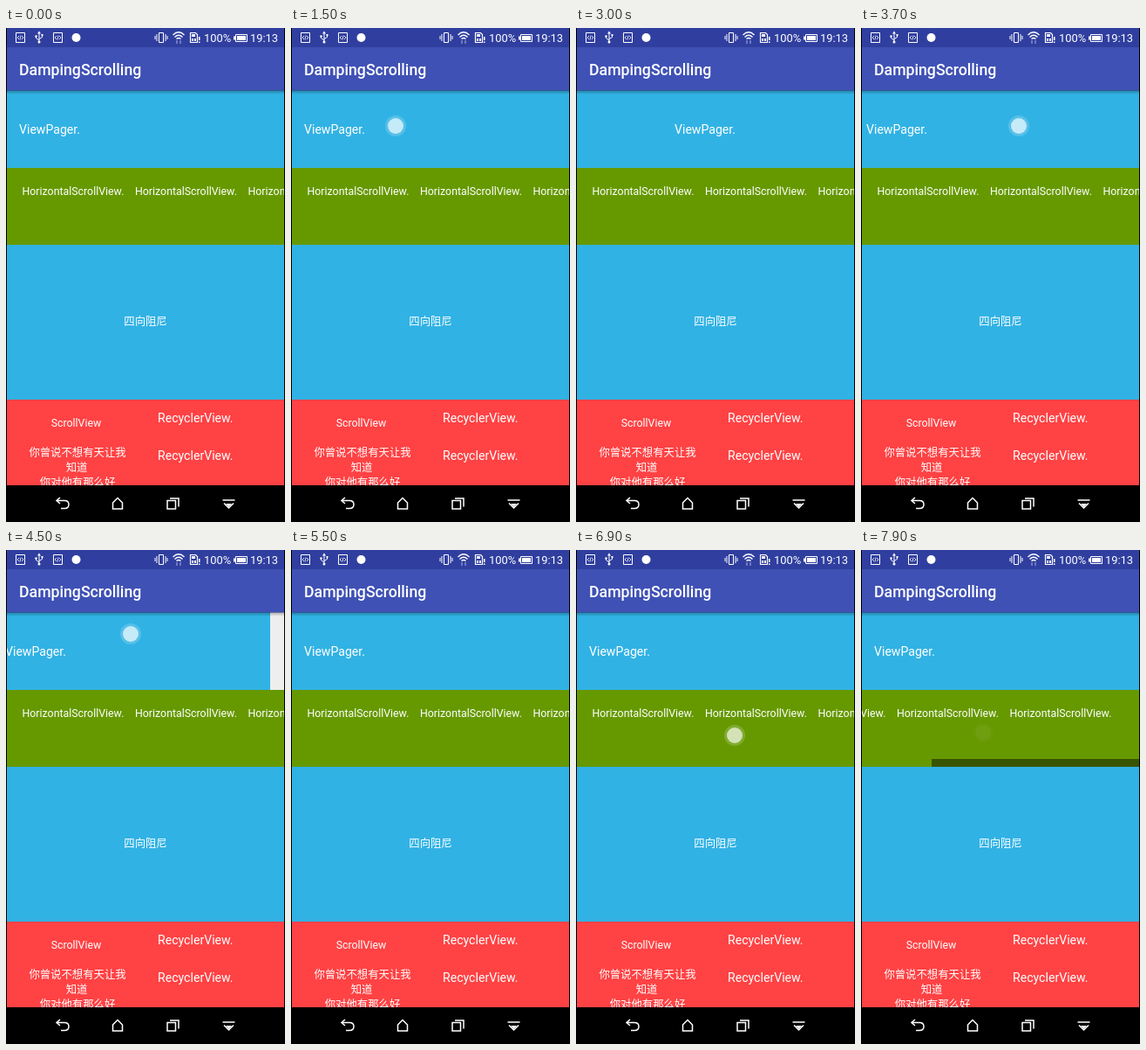
Write an HTML page with a canvas that moves like this. It is 320x565 px and loops after 8000 ms.

```html
<!DOCTYPE html>
<html lang="en">
<head>
<meta charset="utf-8">
<title>Damping scrolling</title>
<style>
  html, body { margin: 0; height: 100%; overflow: hidden; background: #000; }
  canvas { display: block; width: 320px; height: 565px; }
</style>
</head>
<body>
<canvas id="stage" width="320" height="565"></canvas>
<script>
const ctx = document.getElementById('stage').getContext('2d');
const LOOP = 8000, STEP = 100;
const LEFT = 1, WIDTH = 318, ROW_WIDTH = 425;
const BLUE = '#31b2e4', GREEN = '#669900';

// Value per step from a start time; undefined before, last value afterwards.
const sample = (t, start, values) =>
  t < start ? 0 : values[Math.min(values.length - 1, Math.floor((t - start) / STEP))];

const pagerOffset = t =>
  sample(t, 1500, [0, -14, -28, -34, -20, -7, 0]) +
  sample(t, 2800, [9, 99, 220, 285, 311, WIDTH]) +
  sample(t, 3700, [9, 99, 225, 300, WIDTH]) +
  sample(t, 4400, [0, 16, 30, 40, 45, 45, 34, 20, 10, 4, 1, 0]);

const rowOffset = t =>
  sample(t, 6200, [0, -14, -28, -34, -20, -7, 0]) +
  sample(t, 6900, [0, 35, 75, 98, ROW_WIDTH - WIDTH]);

const barAlpha = t =>
  sample(t, 7000, [.45, .45, .45, .45, .45, .45, .3, .12, 0, .45]);

// Finger gestures: start time, y, x per step, opacity.
const touches = [
  [1500, 112, [120, 148, 176, 190], 1],
  [2800, 112, [181, 91], 1],
  [3700, 112, [181, 91], 1],
  [4400, 96, [175, 143, 115, 95, 85, 85], 1],
  [6200, 210, [120, 148, 176, 190], 1],
  [6900, 212, [182, 147, 107], 1],
  [7900, 209, [140], .08]
];

function rect(x, y, w, h, color) {
  ctx.fillStyle = color;
  ctx.fillRect(x, y, w, h);
}

function text(str, x, y, size, align = 'left', weight = 400) {
  ctx.font = `${weight} ${size}px Roboto, "Noto Sans CJK SC", "Noto Sans CJK", sans-serif`;
  ctx.textAlign = align;
  ctx.fillStyle = '#fff';
  ctx.fillText(str, x, y);
}

function stroke(path, width = 1, color = '#fff') {
  ctx.strokeStyle = color;
  ctx.lineWidth = width;
  ctx.stroke(new Path2D(path));
}

function fill(path, color = '#fff') {
  ctx.fillStyle = color;
  ctx.fill(new Path2D(path));
}

function disc(x, y, r, color) {
  ctx.fillStyle = color;
  ctx.beginPath();
  ctx.arc(x, y, r, 0, 7);
  ctx.fill();
}

function strip(y, h, color, offset, width, label) {
  ctx.save();
  ctx.beginPath();
  ctx.rect(LEFT, y, WIDTH, h);
  ctx.clip();
  rect(LEFT, y, WIDTH, h, '#eee');
  rect(LEFT - offset, y, width, h, color);
  for (let i = 0; i < 3; i++) {
    text(label.str, label.x + i * label.gap - offset, label.y, label.size);
  }
  ctx.restore();
}

function statusBar() {
  rect(LEFT, 0, WIDTH, 22, '#303f9f');
  for (const x of [11, 54]) {
    stroke(`M${x + .5} 5.5h10v11h-10z`);
    stroke(`M${x + 4} 9l-2 2l2 2M${x + 7} 9l2 2l-2 2M${x + 6} 8.5l-1 5`, .8);
  }
  stroke('M38 6V16M38 14L34.5 11.5V9.5M38 12.5L41.5 10.5V8');
  fill('M38 3.5l2 3h-4zM40.5 7h2v2h-2z');
  disc(38, 16, 1.5, '#fff');
  disc(34.5, 9.5, 1.2, '#fff');
  disc(80.5, 11, 5, '#fff');

  stroke('M175.5 5.5h5v11h-5zM173 7v8M183 7v8M171 9v4M185 9v4');
  stroke('M191.5 8Q198 1.5 204.5 8M193.5 10.5Q198 6 202.5 10.5M195.5 12.5Q198 10.5 200.5 12.5', 1.3);
  stroke('M196 14v4M200 14v4', 1, '#aab2df');
  stroke('M211.5 5.5h6l2 2v9h-8z', 1.2);
  fill('M213 7h4v3h-4zM213 12h2v3h-2zM216 12h2v3h-2zM221 10h1.5v4h-1.5zM221 15.5h1.5v1.5h-1.5z');
  text('100%', 227, 16, 12.9);
  stroke('M263.5 7.5h13v8h-13z');
  fill('M261 9.5h2v4h-2zM265 9h10v5h-10z');
  text('19:13', 280, 16, 12.9);
}

function navBar() {
  rect(0, 523, 320, 42, '#000');
  stroke('M62 537l-4 3.5l4 3.5M58 540.5h9q5 0 5 4.5t-5 4.5h-4', 1.5);
  stroke('M122.5 543l5.5-5.5l5.5 5.5v7h-11z', 1.5);
  stroke('M185 540.5h9.5v9.5h-9.5zM188 538h10v9.5', 1.5);
  stroke('M248.5 540h14M250 543.5l5.5 5.5l5.5-5.5', 1.5);
  fill('M252 544h7l-3.5 4z');
}

function redPanel() {
  rect(LEFT, 425, WIDTH, 98, '#ff4244');
  text('ScrollView', 80.5, 456, 12.37, 'center');
  text('你曾说不想有天让我', 82, 490, 12.37, 'center');
  text('知道', 81, 507, 12.37, 'center');
  text('你对他有那么好', 82, 524, 12.37, 'center');
  text('RecyclerView.', 174, 451, 14.1);
  text('RecyclerView.', 174, 494, 14.1);
}

function appBar() {
  rect(LEFT, 22, WIDTH, 49.5, '#3f51b5');
  text('DampingScrolling', 15, 53.5, 17.7, 'left', 500);
  const shadow = ctx.createLinearGradient(0, 71, 0, 76);
  shadow.addColorStop(0, 'rgba(0,0,0,.3)');
  shadow.addColorStop(1, 'rgba(0,0,0,0)');
  rect(LEFT, 71, WIDTH, 5, shadow);
}

function drawTouches(t) {
  for (const [start, y, xs, alpha] of touches) {
    const x = xs[Math.floor((t - start) / STEP)];
    if (x === undefined) continue;
    ctx.globalAlpha = alpha;
    disc(x, y, 12, 'rgba(255,255,255,.18)');
    disc(x, y, 9, 'rgba(255,255,255,.66)');
    ctx.globalAlpha = 1;
  }
}

function draw(t) {
  rect(0, 0, 320, 565, '#000');
  const scroll = rowOffset(t);
  strip(71, 89, BLUE, pagerOffset(t), WIDTH * 3,
    { str: 'ViewPager.', x: 15, y: 121, gap: WIDTH, size: 14.1 });
  strip(160, 88, GREEN, scroll, ROW_WIDTH,
    { str: 'HorizontalScrollView.', x: 18.5, y: 191, gap: 129.5, size: 12.37 });
  rect(LEFT + scroll * WIDTH / ROW_WIDTH, 239, WIDTH * WIDTH / ROW_WIDTH, 9,
    `rgba(0,0,0,${barAlpha(t)})`);
  rect(LEFT, 248, WIDTH, 177, BLUE);
  text('四向阻尼', 160, 340, 12.37, 'center');
  redPanel();
  appBar();
  statusBar();
  navBar();
  drawTouches(t);
}

function frame(now) {
  const t = now % LOOP;
  draw(t - t % STEP);
  requestAnimationFrame(frame);
}
requestAnimationFrame(frame);
</script>
</body>
</html>
```
